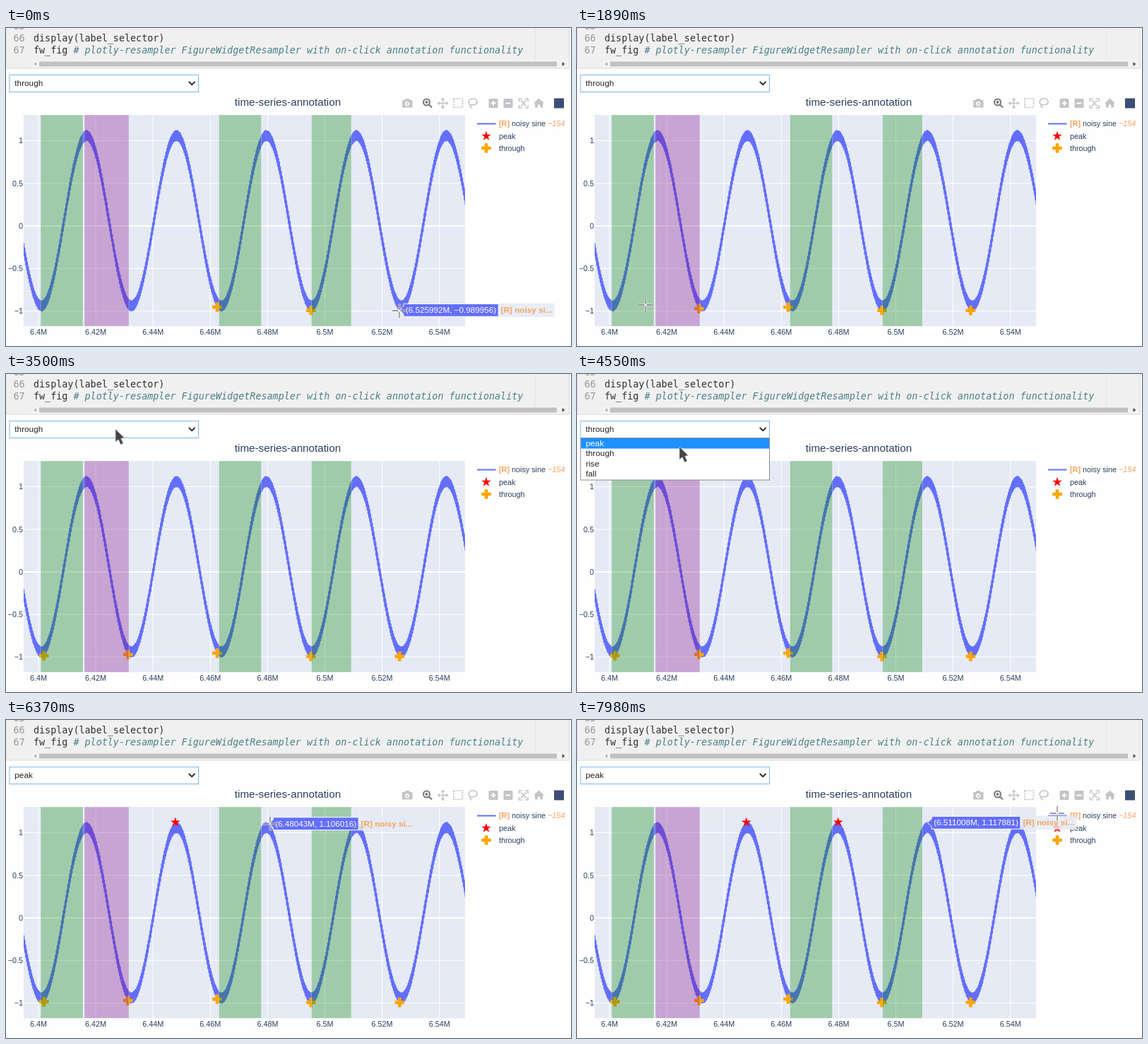
An HTML page that plays this animation: 800 by 450 pixels, repeating every 8 s.

```html
<!DOCTYPE html>
<html lang="en">
<head>
<meta charset="utf-8">
<title>time-series-annotation</title>
<style>
  html, body { margin: 0; width: 100%; height: 100%; overflow: hidden; background: #fefefe; }
  svg { display: block; width: 800px; height: 450px; }
  text { font-family: "Liberation Sans", Arial, sans-serif; font-size: 10.8px; fill: #2a3f5f; white-space: pre; }
  .code text { font: 13.4px "DejaVu Sans Mono", monospace; fill: #303030; }
  .code .num { fill: #999; }
  .code .note { fill: #4a8087; font-style: italic; }
  .ui text { font-size: 11.8px; fill: #222; }
  .title { font-size: 15.2px; }
  .accent { fill: #f4a460; }
  .bold { font-weight: bold; }
  .hover text { font-size: 11.7px; }
  .bar { fill: none; stroke: #c4c4c8; stroke-width: 2; }
  .bar .solid { fill: #c4c4c8; stroke: none; }
  .bar .active { stroke: #77777c; }
</style>
</head>
<body>
<svg viewBox="0 0 800 450">
  <defs>
    <clipPath id="plotClip"><rect x="25" y="123" width="625" height="299"/></clipPath>
    <path id="cross" d="M-6.8 -2.3H-2.3V-6.8H2.3V-2.3H6.8V2.3H2.3V6.8H-2.3V2.3H-6.8Z" fill="#ffa500"/>
    <path id="star" fill="#f00"/>
  </defs>

  <g class="code">
    <rect x="0" y="-2" width="797.5" height="59" fill="#f0f0f0" stroke="#dadada"/>
    <path d="M749.5 0V45" stroke="#e5e5e5"/>
    <text class="num" x="10.5" y="2.3">65</text>
    <text class="num" x="10.5" y="19.3">66</text>
    <text class="num" x="10.5" y="36.3">67</text>
    <text x="39" y="19.3">display(label_selector)</text>
    <text x="39" y="36.3">fw_fig <tspan class="note"># plotly-resampler FigureWidgetResampler with on-click annotation functionality</tspan></text>
    <rect x="36" y="45" width="760" height="11" fill="#f3f3f3"/>
    <rect x="47" y="47.5" width="733" height="7" fill="#c1c1c1"/>
    <path d="M43 48.5V53.5L39.5 51Z" fill="#a8a8a8"/>
    <path d="M787.5 48V54L791.5 51Z" fill="#555"/>
  </g>

  <text class="title" x="399" y="109.5" text-anchor="middle">time-series-annotation</text>
  <rect x="25" y="123" width="625" height="299" fill="#e5eaf5"/>
  <g id="axes"></g>
  <g clip-path="url(#plotClip)">
    <path id="wave" fill="none" stroke="#636efa" stroke-width="2" stroke-linejoin="round"/>
  </g>
  <g id="markers"></g>
  <g id="regions"></g>

  <g id="legend">
    <path d="M667 135.5H693.5" stroke="#636efa" stroke-width="2"/>
    <use href="#star" x="680" y="153"/>
    <use href="#cross" x="680" y="170"/>
    <text x="698" y="139.3"><tspan class="accent bold">[R]</tspan> noisy sine <tspan class="accent" font-style="italic">~154</tspan></text>
    <text x="698" y="156.8">peak</text>
    <text x="698" y="174">through</text>
  </g>

  <g id="bar" class="bar">
    <path class="solid" fill-rule="evenodd" d="M561 102H564.5L566 100H570.5L572 102H575.5V112.5H561ZM568 104A3.2 3.2 0 1 0 568.1 104Z"/>
    <circle cx="568.2" cy="107.2" r="1.5" class="solid"/>
    <g class="active"><circle cx="595.5" cy="105" r="4.5"/><path d="M599 108.5L603 112.5M593.5 105H597.5M595.5 103V107"/></g>
    <path d="M612 106.5H625M618.5 100V113" stroke-width="1.5"/>
    <path class="solid" d="M618.5 98.5L621.5 102H615.5ZM618.5 114.5L621.5 111H615.5ZM610.5 106.5L614 103.5V109.5ZM626.5 106.5L623 103.5V109.5Z"/>
    <rect x="634" y="100" width="12.5" height="12.5" stroke-dasharray="2.2 1.5" stroke-width="1.7"/>
    <path d="M658 109C653 106 655 100 661 100C667 100 669 105 665 108C661 110 657 107 657 110Q657 112 660 113" stroke-width="1.6"/>
    <rect class="solid" x="683.5" y="100" width="13" height="13" rx="1.5"/>
    <rect class="solid" x="704.5" y="100" width="13" height="13" rx="1.5"/>
    <path d="M686.5 106.5H693.5M690 103V110M707.5 106.5H714.5" stroke="#fff"/>
    <path d="M726.5 104V100H730.5M735 100H739V104M739 109V113H735M730.5 113H726.5V109M729 102.5L736.5 110.5M736.5 102.5L729 110.5" stroke-width="1.7"/>
    <path class="solid" d="M754.5 99.5L762 106.5H760V112.5H756.2V108.5H752.8V112.5H749V106.5H747Z"/>
    <rect x="776" y="99.5" width="14" height="14" fill="#3d4e75" stroke="none"/>
  </g>

  <g class="ui">
    <rect x="5" y="66.5" width="267.5" height="24" fill="#fff" stroke="#7db8ea"/>
    <text id="choice" x="12.3" y="82"></text>
    <path d="M258.8 75.8L263.2 80.2L267.6 75.8" fill="none" stroke="#222" stroke-width="1.9"/>
    <g id="menu">
      <rect x="5" y="90.5" width="267.5" height="59.5" fill="#fff" stroke="#8a8a8a"/>
      <rect x="5.5" y="91" width="266.5" height="14.5" fill="#1e90ff"/>
    </g>
  </g>

  <g id="hover" class="hover">
    <rect id="nameBox" height="19.5" fill="#e5eaf5" fill-opacity=".85"/>
    <path id="valueBox" fill="#636efa" stroke="#fff"/>
    <text id="value" style="fill:#fff"></text>
    <text id="name" class="accent bold">[R] noisy si...</text>
  </g>

  <g id="plus">
    <path d="M-10 0H10M0 -10V10" stroke="#fff" stroke-opacity=".75" stroke-width="3"/>
    <path d="M-10 0H-1.5M1.5 0H10M0 -10V-1.5M0 1.5V10" stroke="#777" stroke-width="1.3"/>
  </g>
  <path id="arrow" d="M0 0V18L4.2 14.8L7.5 22L11 20.2L7.8 13.3L12.5 12.3Z" fill="#444" stroke="#ccc" stroke-width=".8"/>
</svg>

<script>
const LOOP = 8000, STEP = 70;
const el = id => document.getElementById(id);
const add = (parent, tag, attrs, text = "") => {
  const node = document.createElementNS("http://www.w3.org/2000/svg", tag);
  for (const key in attrs) node.setAttribute(key, attrs[key]);
  node.textContent = text;
  parent.appendChild(node);
  return node;
};
const show = (node, on) => node.setAttribute("visibility", on ? "visible" : "hidden");

// Data coordinates: x in millions of samples.
const px = x => 46 + (x - 6.4) * 4055;
const py = y => 280 - y * 120.5;

for (let i = 0; i < 8; i++) {
  const value = +(6.4 + i * 0.02).toFixed(2), x = px(value);
  add(el("axes"), "path", { d: `M${x} 123V422`, stroke: "#fff" });
  add(el("axes"), "text", { x, y: 434, "text-anchor": "middle" }, value + "M");
}
for (let v = -1; v <= 1; v += 0.5) {
  add(el("axes"), "path", { d: `M25 ${py(v)}H650`, stroke: "#fff", "stroke-width": v ? 1 : 2 });
  add(el("axes"), "text", { x: 24, y: py(v) + 3.8, "text-anchor": "end" }, String(v).replace("-", "−"));
}

let seed = 7;
const random = () => (seed = seed * 16807 % 2147483647) / 2147483647;
const wave = [];
for (let i = 0; i <= 1000; i++) {
  const x = 24.5 + i * 0.626;
  const noise = i % 2 ? 0.12 - random() * 0.008 : random() * 0.008;
  wave.push(`${x.toFixed(2)} ${py(Math.cos((x - 114) / 127.4 * 2 * Math.PI) + noise).toFixed(2)}`);
}
el("wave").setAttribute("d", "M" + wave.join("L"));

el("star").setAttribute("d", "M" + Array.from({ length: 10 }, (_, i) => {
  const r = i % 2 ? 2.8 : 7.2, a = i * Math.PI / 5;
  return `${(r * Math.sin(a)).toFixed(2)} ${(-r * Math.cos(a)).toFixed(2)}`;
}).join("L") + "Z");

for (const [from, to, fill] of [[49, 109, "green"], [111, 174, "purple"], [301.5, 361.5, "green"], [432.5, 489, "green"]])
  add(el("regions"), "rect", { x: from, y: 123, width: to - from, height: 299, fill, "fill-opacity": 0.3,
    stroke: "#fff", "stroke-opacity": 0.3 });

["peak", "through", "rise", "fall"].forEach((label, i) =>
  add(el("menu"), "text", { x: 12.5, y: 101.7 + i * 14.5, style: i ? "" : "fill:#fff" }, label));

// Appearance time, symbol, x, y
const markers = [
  [0, "cross", 299, 395], [0, "cross", 431.7, 399.8], [420, "cross", 557.3, 399.6],
  [1470, "cross", 172.8, 397], [2520, "cross", 53.7, 398.6],
  [5600, "star", 239.8, 144.8], [6790, "star", 369.8, 144.8]
].map(([at, id, x, y]) => ({ at, node: add(el("markers"), "use", { href: "#" + id, x, y }) }));

// Start, end, x, y
const labels = [
  [0, 490, 6.525992, -0.989956], [1190, 1610, 6.431319, -0.971042], [2240, 2660, 6.401849, -0.983217],
  [5110, 5740, 6.448948, 1.106539], [6230, 6930, 6.48043, 1.106016], [7490, 8000, 6.511008, 1.117881]
];

// Time, x, y
const path = [
  [0, 557, 400], [490, 557, 400], [1260, 173, 397], [1610, 173, 397], [1890, 97, 392],
  [2240, 54, 399], [2660, 54, 399], [3360, 155, 80], [3500, 155, 78], [3990, 155, 78],
  [4410, 145, 103], [4760, 145, 103], [5180, 250, 146], [5390, 240, 145], [5740, 240, 145],
  [6370, 374, 147], [6580, 370, 145], [6930, 370, 145], [7490, 497, 145], [7770, 505, 146], [7980, 680, 132]
];

function cursorAt(t) {
  const i = path.findIndex(p => p[0] > t);
  if (i < 0) return path[path.length - 1].slice(1);
  const [t0, x0, y0] = path[i - 1], [t1, x1, y1] = path[i];
  const u = (t - t0) / (t1 - t0), k = u * u * (3 - 2 * u);
  return [x0 + (x1 - x0) * k, y0 + (y1 - y0) * k];
}

function drawLabel([, , dataX, dataY]) {
  const x = px(dataX), y = py(dataY), left = x + 6;
  const value = el("value"), name = el("name");
  value.textContent = `(${dataX}M, ${String(dataY).replace("-", "−")})`;
  const right = left + value.getComputedTextLength() + 6;
  const place = (node, nx, ny) => { node.setAttribute("x", nx); node.setAttribute("y", ny); };
  place(value, left + 3, y + 4.1);
  place(name, right + 3.5, y + 4.1);
  place(el("nameBox"), right, y - 9.8);
  el("nameBox").setAttribute("width", name.getComputedTextLength() + 6.5);
  el("valueBox").setAttribute("d", `M${x} ${y}L${left} ${y - 5.5}V${y - 9}H${right}V${y + 9}H${left}V${y + 5.5}Z`);
}

function render(t) {
  const [x, y] = cursorAt(t);
  const pointing = t >= 3150 && t < 4900;
  for (const id of ["arrow", "plus"]) el(id).setAttribute("transform", `translate(${x} ${y})`);
  show(el("arrow"), pointing);
  show(el("plus"), !pointing);
  for (const m of markers) show(m.node, t >= m.at);
  const label = labels.find(l => t >= l[0] && t < l[1]);
  show(el("hover"), label);
  if (label) drawLabel(label);
  el("choice").textContent = t < 4690 ? "through" : "peak";
  show(el("menu"), t >= 3920 && t < 4690);
  const fade = t < 4800 ? (3430 - t) / 210 : (t - 4800) / 210;
  el("bar").setAttribute("opacity", Math.max(0, Math.min(1, fade)));
}

const start = performance.now();
function tick() {
  const t = (performance.now() - start) % LOOP;
  render(Math.floor(t / STEP) * STEP);
  requestAnimationFrame(tick);
}
tick();
</script>
</body>
</html>
```
